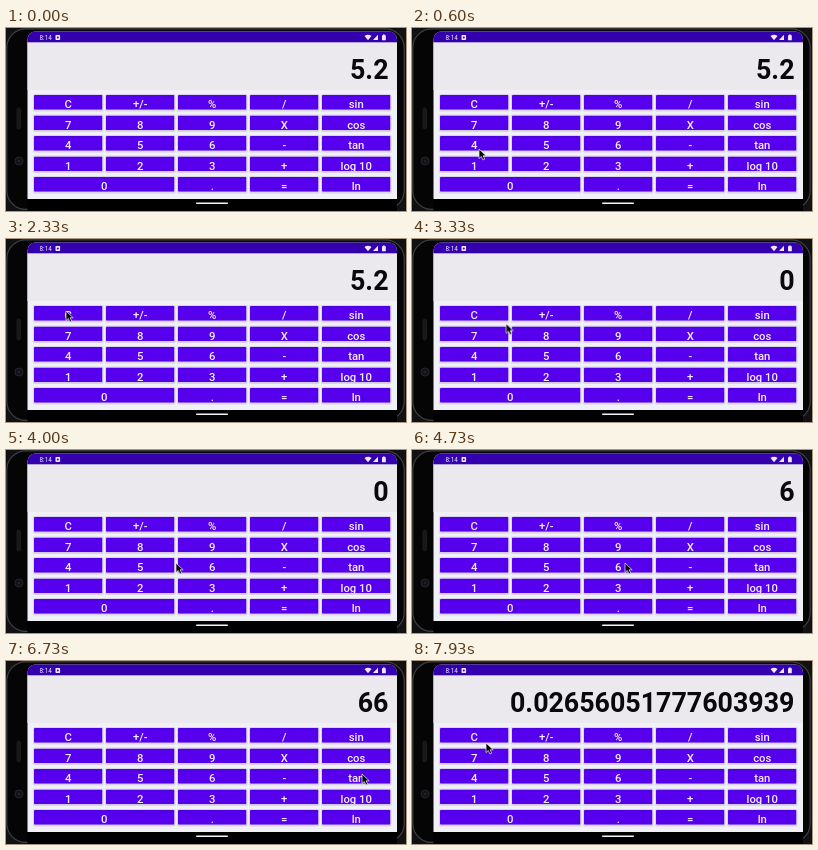
Recreate the animation shown at these times as an HTML page. Size 400 by 183 pixels, loop 8 s.

```html
<!DOCTYPE html>
<html lang="en">
<head>
<meta charset="utf-8">
<title>Calculator</title>
<style>
  html, body { margin: 0; width: 100%; height: 100%; overflow: hidden; background: #000; }
  svg { display: block; }
  #stage { width: 100vw; height: 100vh; }
  text { font-family: Roboto, Arial, sans-serif; }
  .key text { font-size: 11.3px; font-weight: 500; fill: #f4edff; text-anchor: middle; }
  .value { font-size: 26.8px; font-weight: 700; fill: #09090b; text-anchor: end;
    opacity: 0; animation: 8s step-end infinite; }
  .start { animation-name: start; }
  .zero { animation-name: zero; }
  .six { animation-name: six; }
  .sixes { animation-name: sixes; }
  .result { animation-name: result; }
  @keyframes start { 0% { opacity: 1 } 33.4% { opacity: 0 } }
  @keyframes zero { 33.4% { opacity: 1 } 57.5% { opacity: 0 } }
  @keyframes six { 57.5% { opacity: 1 } 62.5% { opacity: 0 } }
  @keyframes sixes { 62.5% { opacity: 1 } 86% { opacity: 0 } }
  @keyframes result { 86%, 100% { opacity: 1 } }

  #cursor { animation: travel 8s ease-in-out infinite; }
  @keyframes travel {
    0%, 2% { transform: translate(100px, 190px); animation-timing-function: ease-out; }
    7.5% { transform: translate(67px, 121px); }
    10% { transform: translate(66px, 119px); }
    17%, 37% { transform: translate(60px, 72px); }
    49%, 51% { transform: translate(170px, 113px); }
    56%, 73% { transform: translate(213px, 113px); }
    82.5%, 88% { transform: translate(356px, 113px); }
    98.5%, 100% { transform: translate(74px, 82px); }
  }
</style>
</head>
<body>
<svg id="stage" viewBox="0 0 400 183">
  <defs>
    <linearGradient id="keyFill" x2="0" y2="1">
      <stop offset="0" stop-color="#4d00df"/>
      <stop offset=".2" stop-color="#5700f0"/>
      <stop offset="1" stop-color="#5500ea"/>
    </linearGradient>
    <clipPath id="screen"><rect x="21.5" y="3.5" width="369.5" height="190" rx="8"/></clipPath>
  </defs>

  <rect width="400" height="183" fill="#111113"/>
  <rect x=".8" y=".8" width="397.4" height="180.6" rx="19" fill="#050506" stroke="#414145" stroke-width="1.2"/>
  <rect x="11" y="80" width="3.5" height="21" rx="1.7" fill="#17171a" stroke="#252529" stroke-width=".6"/>
  <circle cx="13" cy="133" r="4" fill="#101216" stroke="#24262b"/>
  <circle cx="13" cy="133" r="1.5" fill="#1d222b"/>

  <g clip-path="url(#screen)">
    <rect x="21" y="3" width="371" height="168" fill="#f2f0f7"/>
    <rect x="21" y="14" width="371" height="48" fill="#ebe9ed"/>
    <rect x="21" y="3" width="371" height="11.3" fill="#3400ae"/>
    <rect x="21" y="171" width="371" height="12" fill="#000"/>
  </g>
  <rect x="190" y="174.5" width="32" height="1.5" rx=".7" fill="#f5f5f5"/>

  <g fill="#eee9ff">
    <text x="33.5" y="12" font-size="6.4">8:14</text>
    <rect x="49.5" y="7" width="4.6" height="5" rx=".7"/>
    <circle cx="51.8" cy="9.4" r="1" fill="#3400ae"/>
    <path d="M358.5 8Q362 5.3 365.5 8L362 12.2Z"/>
    <path d="M367 12L372 6.8V12Z"/>
    <path d="M376 7.2h1v-.8h1.8v.8h1V12.2H376Z"/>
  </g>

  <text class="value start" x="382.5" y="51">5.2</text>
  <text class="value zero" x="382.5" y="51">0</text>
  <text class="value six" x="382.5" y="51">6</text>
  <text class="value sixes" x="382.5" y="51">66</text>
  <text class="value result" x="382.5" y="51">0.02656051777603939</text>

  <g id="keys"></g>

  <g id="cursor">
    <path d="M0 0V9.6L2.3 7.5L3.9 11L5.7 10.2L4.2 6.8H7.2Z" fill="#080808" stroke="#eee" stroke-width=".7" stroke-linejoin="round"/>
  </g>
</svg>
<script>
  const rows = [
    ['C', '+/-', '%', '/', 'sin'],
    ['7', '8', '9', 'X', 'cos'],
    ['4', '5', '6', '-', 'tan'],
    ['1', '2', '3', '+', 'log 10'],
    ['0', '', '.', '=', 'ln']
  ];
  const pitchX = 72, pitchY = 20.5, keyWidth = 68.5, keyHeight = 14.8;

  // Each key is a nested svg so that its label is cut at the key's edge.
  const key = (label, column, row) => {
    const x = 28 + column * pitchX;
    const y = 67 + row * pitchY;
    const width = label === '0' ? keyWidth + pitchX : keyWidth;
    return `<rect x="${x - 1}" y="${y - 1}" width="${width + 2}" height="${keyHeight + 2.6}" rx="1.5" fill="#d9d4e8"/>
      <svg class="key" x="${x}" y="${y}" width="${width}" height="${keyHeight}">
        <rect width="100%" height="100%" rx="1" fill="url(#keyFill)"/>
        <text x="50%" y="13.4">${label}</text>
      </svg>`;
  };

  document.getElementById('keys').innerHTML = rows
    .flatMap((labels, row) => labels.map((label, column) => label && key(label, column, row)))
    .join('');
</script>
</body>
</html>
```
